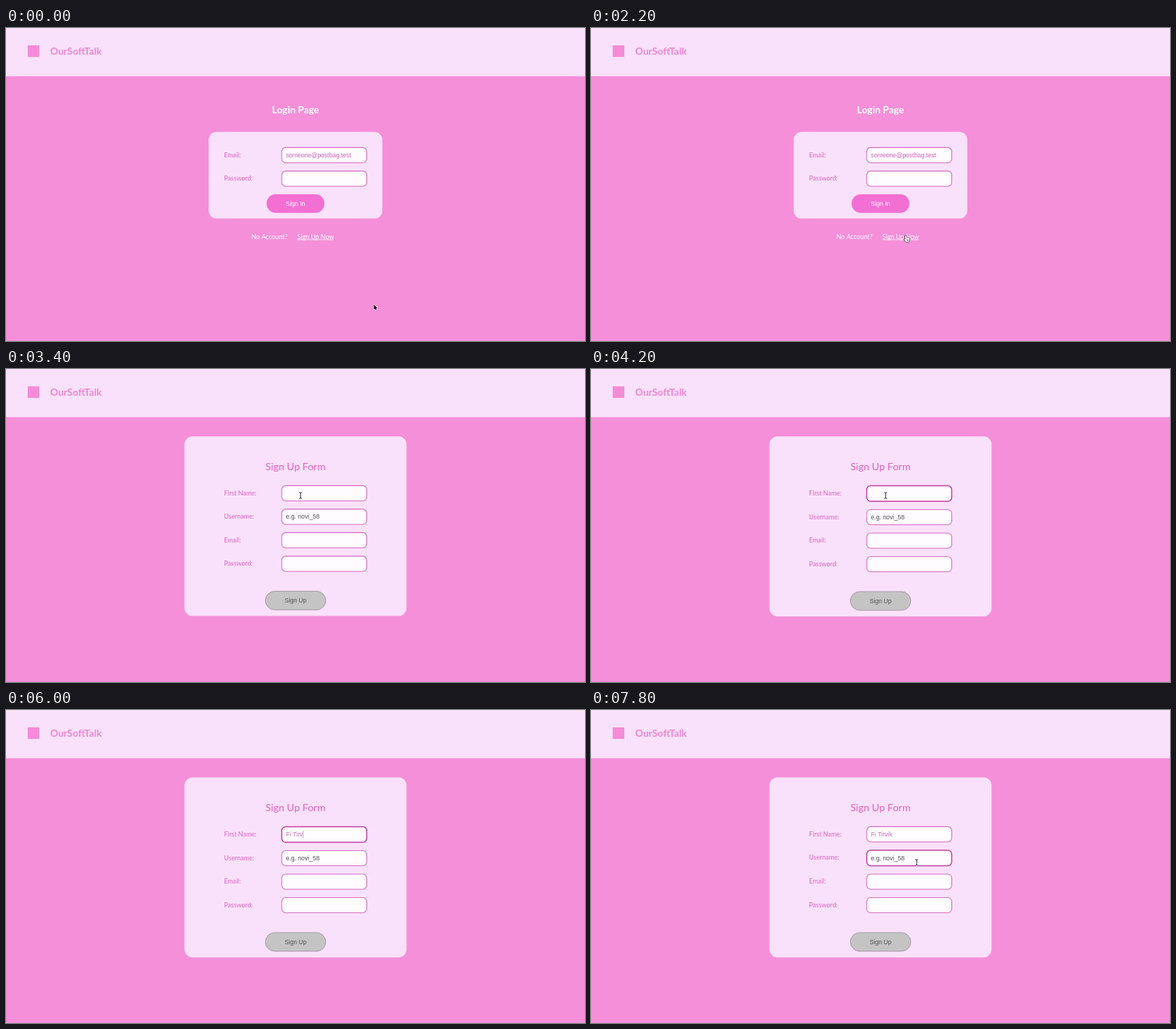
An HTML page with a canvas that plays this animation: 800 by 433 pixels, repeating every 8000 ms.

```html
<!DOCTYPE html>
<html lang="en">
<head>
<meta charset="utf-8">
<title>Sign up walkthrough</title>
<style>
  html, body { margin: 0; width: 100%; height: 100%; overflow: hidden; background: #f58fd9; }
  canvas { display: block; width: 100%; height: 100%; }
</style>
</head>
<body>
<canvas id="stage"></canvas>
<script>
const W = 800, H = 433, LOOP = 8000, STEP = 200;
const canvas = document.getElementById('stage');
const ctx = canvas.getContext('2d');
const ratio = Math.max(1, window.devicePixelRatio || 1);
canvas.width = Math.round(W * ratio);
canvas.height = Math.round(H * ratio);

const PINK = '#f58fd9', PALE = '#f9e1fb', ROSE = '#e262c2', EDGE = '#d66bc1', FOCUS = '#c43fa4';
const UI = 'Lato, "Open Sans", sans-serif';
const FIELD = '"Liberation Sans", Arial, sans-serif';
const FIELD_FONT = `8.5px ${FIELD}`;
const LABEL_FONT = `8.85px ${UI}`;

const SIGNUP_AT = 2400, STATUS_END = 2800;
const NAME_FOCUS = 3700, USER_FOCUS = 7300;
const TYPE_START = 4800, TYPE_GAP = 200;
const NAME = 'Fi Tirvik';
const TYPE_END = TYPE_START + (NAME.length - 1) * TYPE_GAP;
const HIDE_END = 6600;

const ROWS = ['First Name:', 'Username:', 'Email:', 'Password:'];
const ROW_TOP = 161.4, ROW_PITCH = 32.5, FOCUS_GROW = 0.55;
const BOX = { x: 381, w: 117.4, h: 21.1 };

// Pointer waypoints: time, x, y
const PATH = [
  [0, 508, 382], [200, 512, 380], [800, 566, 346], [1400, 462, 299],
  [1800, 435, 287], [2400, 435, 287], [3200, 407, 175],
  [6400, 407, 175], [6800, 450, 211], [LOOP, 450, 211]
];

function pointerAt(t) {
  const i = PATH.findIndex((p, k) => k > 0 && t <= p[0]);
  const [t0, x0, y0] = PATH[i - 1], [t1, x1, y1] = PATH[i];
  const u = (t - t0) / (t1 - t0), e = u * u * (3 - 2 * u);
  return { x: x0 + (x1 - x0) * e, y: y0 + (y1 - y0) * e };
}

function text(str, x, y, font, color, align = 'left') {
  ctx.font = font;
  ctx.fillStyle = color;
  ctx.textAlign = align;
  ctx.fillText(str, x, y);
}

function panel(x, y, w, h, r, fill, stroke, line = 1) {
  ctx.beginPath();
  ctx.roundRect(x, y, w, h, r);
  ctx.fillStyle = fill;
  ctx.fill();
  if (stroke) {
    ctx.strokeStyle = stroke;
    ctx.lineWidth = line;
    ctx.stroke();
  }
}

function field(y, focused = false) {
  const grow = focused ? FOCUS_GROW : 0;
  panel(BOX.x, y, BOX.w, BOX.h + grow, 5.5, '#fefcfe', focused ? FOCUS : EDGE, focused ? 1.5 : 1.1);
}

function header() {
  ctx.fillStyle = PINK;
  ctx.fillRect(0, 0, W, H);
  ctx.fillStyle = PALE;
  ctx.fillRect(0, 0, W, 66.7);
  ctx.fillStyle = '#f58bd8';
  ctx.fillRect(30, 24, 16, 16);
  text('OurSoftTalk', 61, 36.9, `bold 13.6px ${UI}`, '#ef86d3');
}

function loginPage() {
  text('Login Page', 400, 117.6, `bold 13.5px ${UI}`, '#fff', 'center');
  panel(280, 143.7, 240, 119.9, 11, PALE);
  text('Email:', 301.3, 178.6, LABEL_FONT, ROSE);
  text('Password:', 301.3, 211.1, LABEL_FONT, ROSE);
  field(165.4);
  field(197.9);
  text('someone@postbag.test', 386.8, 178.8, FIELD_FONT, '#d35fbd');
  panel(360, 230, 80, 25.7, 12.85, '#f36fd3');
  text('Sign In', 400, 245.8, FIELD_FONT, '#fff', 'center');
  text('No Account?', 339, 291.8, LABEL_FONT, '#fff');
  text('Sign Up Now', 402.5, 291.8, LABEL_FONT, '#fff');
  ctx.fillRect(402.5, 292.6, 50.5, 0.7);
}

function signupPage(t) {
  const focus = t >= USER_FOCUS ? 1 : t >= NAME_FOCUS ? 0 : -1;
  const shift = focus >= 0 ? FOCUS_GROW : 0;
  panel(246.6, 93.2, 306.8, 248.4 + shift, 11, PALE);
  text('Sign Up Form', 400, 139.8, `14px ${UI}`, ROSE, 'center');

  ROWS.forEach((label, i) => {
    const y = ROW_TOP + i * ROW_PITCH + (focus >= 0 && i > focus ? shift : 0);
    const base = y + 13.4 + (i === focus ? shift / 2 : 0);
    text(label, 301.3, base - 0.1, LABEL_FONT, ROSE);
    field(y, i === focus);
    if (i === 1) text('e.g. novi_58', 386.8, base, FIELD_FONT, '#555058');
    if (i === 0) typedName(t, base);
    if (i === focus) caret(t, i, base);
  });

  panel(358.4, 307.4 + shift, 83.4, 25.8, 12.9, '#c4c4c4', '#9d919d', 0.9);
  text('Sign Up', 400, 323.3 + shift, FIELD_FONT, '#515151', 'center');
}

function typed(t) {
  return NAME.slice(0, Math.max(0, Math.floor((t - TYPE_START) / TYPE_GAP) + 1));
}

function typedName(t, base) {
  text(typed(t), 386.8, base, FIELD_FONT, '#d668c2');
}

function caret(t, row, base) {
  const since = row === 1 ? USER_FOCUS
    : t < TYPE_START ? NAME_FOCUS
    : Math.min(TYPE_END, t - (t - TYPE_START) % TYPE_GAP);
  if ((t - since) % 1000 >= 500) return;
  ctx.font = FIELD_FONT;
  const x = 386.8 + (row === 0 ? ctx.measureText(typed(t)).width : 0);
  ctx.fillStyle = '#a978a2';
  ctx.fillRect(x, base - 8, 0.6, 9.8);
}

function statusBar() {
  panel(-2, 422, 73.8, 14, 3, '#202022', '#57434f', 0.6);
  text('localhost:5173/signup', 2.5, 430, '6.2px Inter, Roboto, sans-serif', '#e4e4e6');
}

function outlined(points, fill, stroke, line) {
  ctx.beginPath();
  points.forEach(([x, y]) => ctx.lineTo(x, y));
  ctx.closePath();
  ctx.lineJoin = 'round';
  ctx.lineWidth = line;
  ctx.strokeStyle = stroke;
  ctx.stroke();
  ctx.fillStyle = fill;
  ctx.fill();
}

function arrow() {
  outlined([[0.4, 0.6], [0.4, 7.6], [1.9, 6.3], [2.9, 8.6], [4, 8.1], [3, 5.9], [5, 5.8]], '#000', '#fff', 1.1);
}

function hand() {
  outlined([[-1.2, 0.4], [-0.2, 0], [0.6, 0.7], [1.2, 3], [3.6, 3.3], [4.9, 4.3], [4.9, 6.6],
    [4.1, 8.9], [0.5, 8.9], [-1.7, 6.6], [-2.2, 5.2], [-1.3, 4.9], [-0.4, 5.6]], '#fff', '#222', 1.2);
  ctx.fillStyle = '#333';
  [1.2, 2.4, 3.6].forEach(x => ctx.fillRect(x, 5.4, 0.5, 2.2));
}

function beam() {
  ctx.beginPath();
  [-1, 1].forEach(s => {
    ctx.moveTo(-1.9, 4.2 * s);
    ctx.quadraticCurveTo(0, 4.2 * s, 0, 3 * s);
    ctx.quadraticCurveTo(0, 4.2 * s, 1.9, 4.2 * s);
  });
  ctx.moveTo(0, -3.2);
  ctx.lineTo(0, 3.2);
  [['#fff', 2], ['#222', 1]].forEach(([color, line]) => {
    ctx.strokeStyle = color;
    ctx.lineWidth = line;
    ctx.stroke();
  });
}

function pointer(t) {
  if (t >= TYPE_START && t < HIDE_END) return;
  const { x, y } = pointerAt(t);
  const overLink = t < SIGNUP_AT && x > 402 && x < 453 && y > 283 && y < 294;
  const overField = t >= SIGNUP_AT && x > BOX.x && x < BOX.x + BOX.w
    && ROWS.some((_, i) => Math.abs(y - ROW_TOP - i * ROW_PITCH - BOX.h / 2) < 11);
  ctx.save();
  ctx.translate(x, y);
  (overLink ? hand : overField ? beam : arrow)();
  ctx.restore();
}

function draw(t) {
  ctx.setTransform(canvas.width / W, 0, 0, canvas.height / H, 0, 0);
  header();
  if (t < SIGNUP_AT) loginPage();
  else signupPage(t);
  if (t >= SIGNUP_AT && t < STATUS_END) statusBar();
  pointer(t);
}

function tick() {
  const t = performance.now() % LOOP;
  draw(Math.floor(t / STEP) * STEP);
  requestAnimationFrame(tick);
}
tick();
</script>
</body>
</html>
```
